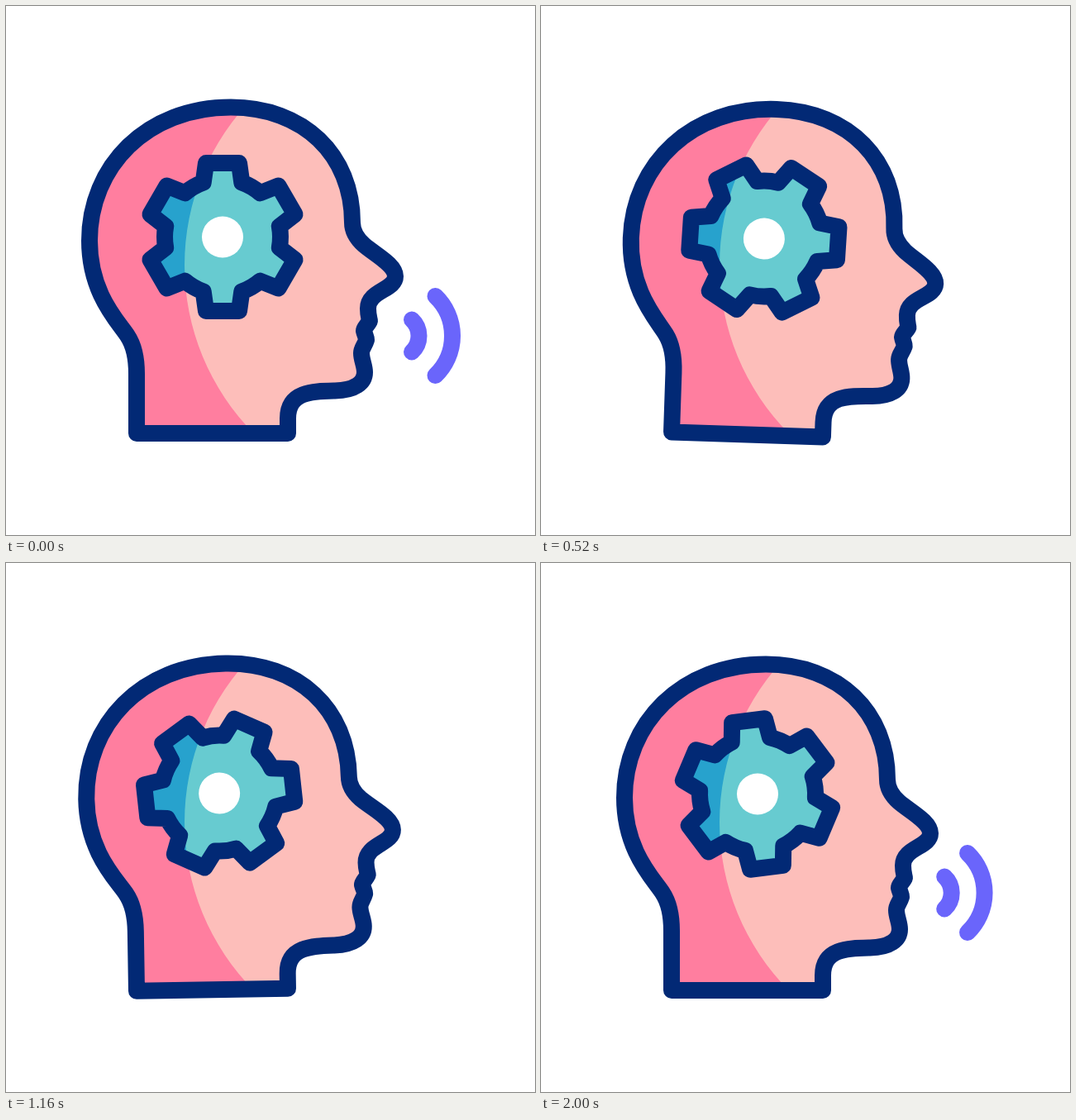
An HTML page with a canvas that plays this animation: 640x640 px, repeating every 2.04 s.

```html
<!DOCTYPE html>
<html lang="en">
<head>
<meta charset="utf-8">
<title>Thinking and speaking</title>
<style>
  html, body { margin: 0; width: 100%; height: 100%; overflow: hidden; background: #fff; }
  canvas { display: block; width: 640px; height: 640px; }
</style>
</head>
<body>
<canvas id="stage" width="640" height="640"></canvas>
<script>
const ctx = document.getElementById('stage').getContext('2d');
const STEP = 40, STEPS = 51;
const NAVY = '#022975', SKIN = '#fdbeba', PINK = '#ff7e9f';
const TEAL = '#67cbd0', BLUE = '#27a2cd', VIOLET = '#6a65fb';
const PIVOT = [205, 517], HUB = [262, 279.5];

const head = new Path2D(`M158 517V445C158 425 155 411 147 399C136 382 101 348 101 284
  C101 194 170 122.5 272 122.5C360 122.5 419 180 419 262C419 273 424 281 433 289
  C447 301 471 313 471 327C471 344 438 344 438 366C438 373 439 376 440 381
  C437 387 433 389 433 393C434 398 436 400 436 404C434 411 430 414 430 420
  C430 428 434 435 434 443C434 456 422 465 398 465.5C372 466 341 466 341 499V517Z`);

// Everything left of a large fixed circle lies in shade.
const shade = new Path2D();
shade.rect(0, 0, 640, 640);
shade.arc(505, 313.6, 289, 0, 2 * Math.PI);

const waves = [
  { path: new Path2D('M491 379.5A26.6 26.6 0 0 1 491 418.5'), speed: 2.8, fade: [5, 9] },
  { path: new Path2D('M519.5 351A66.4 66.4 0 0 1 519.5 447'), speed: 3.45, fade: [4, 8] }
];
const waveStarts = [0, 16, 32, STEPS];

// Head tilt: [step, degrees]
const tilts = [[0, 0], [8, -5], [16, 5], [24, -3], [32, 0], [STEPS, 0]];

const rad = deg => deg * Math.PI / 180;
const clamp = v => Math.max(0, Math.min(1, v));

function makeGear() {
  const gear = new Path2D();
  const tooth = [[-23.3, -66], [-20, -89.5], [20, -89.5], [23.3, -66]];
  const r = Math.hypot(...tooth[0]);
  const half = Math.atan2(23.3, 66);
  for (let i = 0; i < 6; i++) {
    const a = rad(60 * i), c = Math.cos(a), s = Math.sin(a);
    for (const [x, y] of tooth) gear.lineTo(x * c - y * s, x * s + y * c);
    const up = a - Math.PI / 2;
    gear.arc(0, 0, r, up + half, up + rad(60) - half);
  }
  gear.closePath();
  return gear;
}
const gear = makeGear();

function tiltAt(step) {
  const i = tilts.findIndex(k => k[0] > step);
  const [t0, a] = tilts[i - 1], [t1, b] = tilts[i];
  return a + (b - a) * (1 - Math.cos(Math.PI * (step - t0) / (t1 - t0))) / 2;
}

function shaded(path, light, dark, pose) {
  ctx.save();
  pose();
  ctx.fillStyle = light;
  ctx.fill(path);
  ctx.clip(path);
  ctx.resetTransform();
  ctx.fillStyle = dark;
  ctx.fill(shade, 'evenodd');
  ctx.restore();

  ctx.save();
  pose();
  ctx.strokeStyle = NAVY;
  ctx.stroke(path);
  ctx.restore();
}

function drawWaves(step) {
  const start = waveStarts.find(s => step >= s - 3 && step < s + 10);
  if (start === undefined) return;
  const t = step - start;
  ctx.strokeStyle = VIOLET;
  for (const { path, speed, fade: [from, to] } of waves) {
    ctx.save();
    ctx.globalAlpha = clamp((t + 3) / 2) * clamp((to - t) / (to - from));
    ctx.translate(speed * t, 0);
    ctx.stroke(path);
    ctx.restore();
  }
}

function draw(step) {
  const tilt = rad(tiltAt(step));
  const poseHead = () => {
    ctx.translate(...PIVOT);
    ctx.rotate(tilt);
    ctx.translate(-PIVOT[0], -PIVOT[1]);
  };
  const poseGear = () => {
    poseHead();
    ctx.translate(...HUB);
    ctx.rotate(2 * Math.PI * step / STEPS);
  };

  ctx.resetTransform();
  ctx.fillStyle = '#fff';
  ctx.fillRect(0, 0, 640, 640);
  ctx.lineWidth = 20;
  ctx.lineCap = ctx.lineJoin = 'round';

  shaded(head, SKIN, PINK, poseHead);
  shaded(gear, TEAL, BLUE, poseGear);

  ctx.save();
  poseHead();
  ctx.fillStyle = '#fff';
  ctx.beginPath();
  ctx.arc(...HUB, 25, 0, 2 * Math.PI);
  ctx.fill();
  drawWaves(step);
  ctx.restore();
}

const begin = performance.now();
function tick() {
  const elapsed = performance.now() - begin;
  draw(Math.floor(elapsed / STEP) % STEPS);
  requestAnimationFrame(tick);
}
tick();
</script>
</body>
</html>
```
